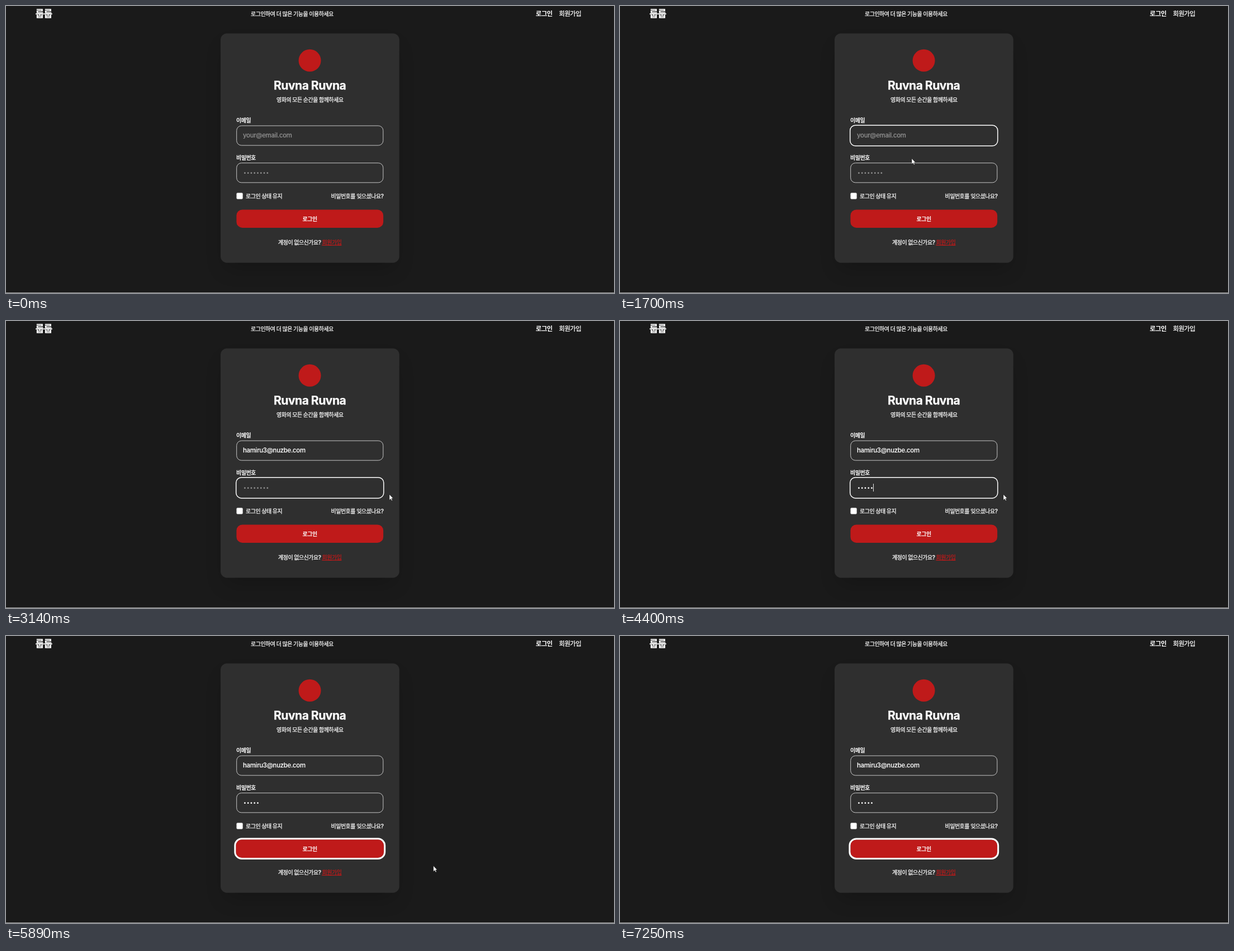
Animation, 1088 px wide and 515 px high, one loop 8 s. Source, as an HTML page:

```html
<!DOCTYPE html>
<html lang="ko">
<head>
<meta charset="utf-8">
<title>로그인</title>
<style>
  html, body { margin: 0; width: 100%; height: 100%; overflow: hidden; background: #1a1a1a; }
  svg { display: block; width: 1088px; height: 515px; }
  text {
    font: 500 10px Inter, "Noto Sans CJK KR", "Noto Sans CJK", sans-serif;
    letter-spacing: -.05em; fill: #fff; stroke: #fff; stroke-width: .25; white-space: pre;
  }
  .bold { font-weight: 700; stroke-width: 0; }
  .nav { font-size: 11.43px; }
  .brand { font-size: 17.1px; font-weight: 900; }
  .title { font-size: 21.2px; font-weight: 700; letter-spacing: -.027em; }
  .field { font-size: 11.43px; letter-spacing: -.027em; stroke-width: .1; }
  .hint { fill: #909090; stroke: #909090; }
  .mid { text-anchor: middle; }
  .box { fill: none; stroke: #d8d8d8; stroke-width: .9; }
  .ring { fill: none; stroke: #fff; stroke-width: 1.5; }
  .shadow { filter: blur(18px); }
  .red { fill: #bf1a1a; }
  .link { fill: #bf1a1a; stroke: #bf1a1a; text-decoration: underline; }
</style>
</head>
<body>
<svg viewBox="0 0 1088 515">
  <rect width="1088" height="515" fill="#1a1a1a"/>
  <rect y="514" width="1088" height="1" fill="#a0a0a0"/>

  <text class="brand" x="52.6" y="20.3">룹룹</text>
  <text x="438" y="17.7">로그인하여 더 많은 기능을 이용하세요</text>
  <text class="nav bold" x="948" y="18.3">로그인</text>
  <text class="nav" x="989.5" y="18.3">회원가입</text>

  <rect class="shadow" x="393" y="76" width="302" height="394" fill="#000" opacity=".2"/>
  <rect x="384" y="49.2" width="319.8" height="411.5" rx="11.4" fill="#2f2f2f"/>
  <circle class="red" cx="543.6" cy="97.8" r="20"/>
  <text class="title mid" x="543.6" y="150">Ruvna Ruvna</text>
  <text class="mid" x="543.8" y="171.6">영화의 모든 순간을 함께하세요</text>

  <text class="bold" x="412" y="208.6">이메일</text>
  <rect class="box" id="mailBox" x="412.7" y="214.9" width="262.2" height="35.2" rx="8.6"/>
  <rect class="ring" id="mailRing" x="411.7" y="213.9" width="264.2" height="37.2" rx="9.6"/>
  <text class="field hint" id="mailHint" x="424" y="236.4">your@email.com</text>
  <text class="field" id="mail" x="424" y="236.4">hamiru3@nuzbe.com</text>

  <text class="bold" x="412" y="275.5">비밀번호</text>
  <rect class="box" id="passBox" x="412.7" y="281.7" width="262.2" height="35.2" rx="8.6"/>
  <rect class="ring" id="passRing" x="411.7" y="280.7" width="264.2" height="37.2" rx="9.6"/>
  <g id="dots"></g>
  <rect id="caret" width=".9" height="14" fill="#fff"/>

  <rect x="412.5" y="335.3" width="11.2" height="11.2" rx="2" fill="#fff" stroke="#999" stroke-width=".4"/>
  <text x="429" y="345.2">로그인 상태 유지</text>
  <text x="581.5" y="345.2">비밀번호를 잊으셨나요?</text>

  <g id="button">
    <rect class="red" x="412.4" y="365.5" width="262.8" height="32.4" rx="10.5"/>
    <rect class="ring" id="buttonRing" x="410.9" y="364" width="265.8" height="35.4" rx="12" style="stroke-width:3"/>
    <text class="mid bold" x="543.6" y="385.5">로그인</text>
  </g>
  <text x="487" y="427.8">계정이 없으신가요?</text>
  <text class="link" x="565.6" y="427.8">회원가입</text>

  <g id="cursor">
    <circle id="press" cx="-.6" r="8.6" fill="#ff0" opacity=".5"/>
    <path id="arrow" d="M0 0V10.4L2.4 8.2L4 11.6L5.6 10.9L4.1 7.5H7Z" fill="#fff" stroke="#000" stroke-width=".5"/>
    <path id="beam" d="M-2-5H2M0-5V5M-2 5H2" fill="none" stroke="#c8c8a0" stroke-width=".8"/>
    <path id="hand" transform="translate(.8 .8)" d="M-.9 .4Q.1-.7 1 .4V4.6L2.6 4.2L3.2 4.9L4.6 4.7L5.2 5.5Q6.7 5.2 6.7 6.7V9.2L5.5 12.6H.3L-3.4 7.9Q-3.3 6.2-1.8 7L-.9 7.9Z" fill="#fff" stroke="#222" stroke-width=".7"/>
  </g>
</svg>
<script>
const LOOP = 8000, BLINK = 530, DOT_GAP = 5.78;
const CLICK = { mail: 1080, pass: 2590, button: 5490 };
const PASTE = 2190, FOCUS_DELAY = 65;
const KEYS = [3470, 3670, 3870, 3870, 4400];
const ENTER = 320, LEAVE = 7250;

const el = Object.fromEntries([...document.querySelectorAll('[id]')].map(e => [e.id, e]));
const within = (t, a, b) => t >= a && t < b;
const clamp = v => Math.max(0, Math.min(1, v));
const easeOut = k => 1 - (1 - k) ** 2;
const show = (e, on) => e.setAttribute('visibility', on ? 'visible' : 'hidden');

// Pointer moves, each easing out from wherever the one before ended
const home = { x: 981, y: 481 };
const moves = [
  { from: ENTER, to: 1020, x: 522, y: 238 },
  { from: 1430, to: 1950, x: 522, y: 284 },
  { from: 1980, to: 2590, x: 524, y: 294 },
  { from: 2690, to: 3140, x: 686, y: 311 },
  { from: 4860, to: 5070, x: 764, y: 322 },
  { from: 5070, to: 5440, x: 607, y: 372 },
  { from: 5680, to: 6240, x: 865, y: 438 },
  { from: 6240, to: 6520, x: 897, y: 430 },
  { from: 6520, to: 6850, x: 903, y: 429 },
  { from: 6990, to: LEAVE, x: 1080, y: 515 }
];

for (let i = 0; i < 8; i++) {
  const dot = document.createElementNS('http://www.w3.org/2000/svg', 'circle');
  dot.setAttribute('cx', 427.4 + DOT_GAP * i);
  dot.setAttribute('cy', 299.7);
  dot.setAttribute('r', 1.4);
  el.dots.append(dot);
}

function pointAt(t) {
  return moves.reduce((p, m) => {
    const k = easeOut(clamp((t - m.from) / (m.to - m.from)));
    return { x: p.x + (m.x - p.x) * k, y: p.y + (m.y - p.y) * k };
  }, home);
}

function overAt(t) {
  const { x, y } = pointAt(t);
  if (x < 412 || x > 676) return 'page';
  if (within(y, 215, 250) || within(y, 281, 317)) return 'field';
  return within(y, 365, 398) ? 'button' : 'page';
}

function drawCursor(t) {
  const { x, y } = pointAt(t);
  const over = overAt(t);
  const visible = within(t, ENTER, LEAVE);
  el.cursor.setAttribute('transform', `translate(${x} ${y})`);
  show(el.arrow, visible && over === 'page');
  show(el.beam, visible && over === 'field');
  show(el.hand, visible && over === 'button');
  show(el.press, Object.values(CLICK).some(c => within(t, c, c + 140)));
}

function drawFocus(t) {
  const [mail, pass, button] = Object.values(CLICK).map(c => t >= c + FOCUS_DELAY);
  show(el.mailRing, mail && !pass);
  show(el.mailBox, !mail || pass);
  show(el.passRing, pass && !button);
  show(el.passBox, !pass || button);
  show(el.buttonRing, button);
}

function drawCaret(t, filled, count) {
  const blink = start => Math.floor((t - start) / BLINK) % 2 === 0;
  const inMail = within(t, CLICK.mail, CLICK.pass);
  const inPass = within(t, CLICK.pass, 4860);
  const lit = inMail ? blink(CLICK.mail) : inPass && (count > 0 || blink(CLICK.pass));
  const mailEnd = filled ? el.mail.getComputedTextLength() : 0;
  el.caret.setAttribute('x', 424.2 + (inMail ? mailEnd : DOT_GAP * count));
  el.caret.setAttribute('y', inMail ? 225 : 292);
  show(el.caret, lit);
}

function drawButton(t) {
  const hover = clamp((t - 5300) / 150) - clamp((t - 5800) / 150);
  el.button.setAttribute('transform',
    `translate(543.8 381.7) scale(${1 + .02 * hover}) translate(-543.8 -381.7)`);
}

function draw(t) {
  const filled = t >= PASTE;
  const count = KEYS.filter(k => k <= t).length;
  show(el.mailHint, !filled);
  show(el.mail, filled);
  [...el.dots.children].forEach((dot, i) => {
    dot.setAttribute('fill', count ? '#fff' : '#909090');
    show(dot, !count || i < count);
  });
  drawFocus(t);
  drawCaret(t, filled, count);
  drawButton(t);
  drawCursor(t);
}

const begin = performance.now();
function tick() {
  draw((performance.now() - begin) % LOOP);
  requestAnimationFrame(tick);
}
tick();
</script>
</body>
</html>
```
